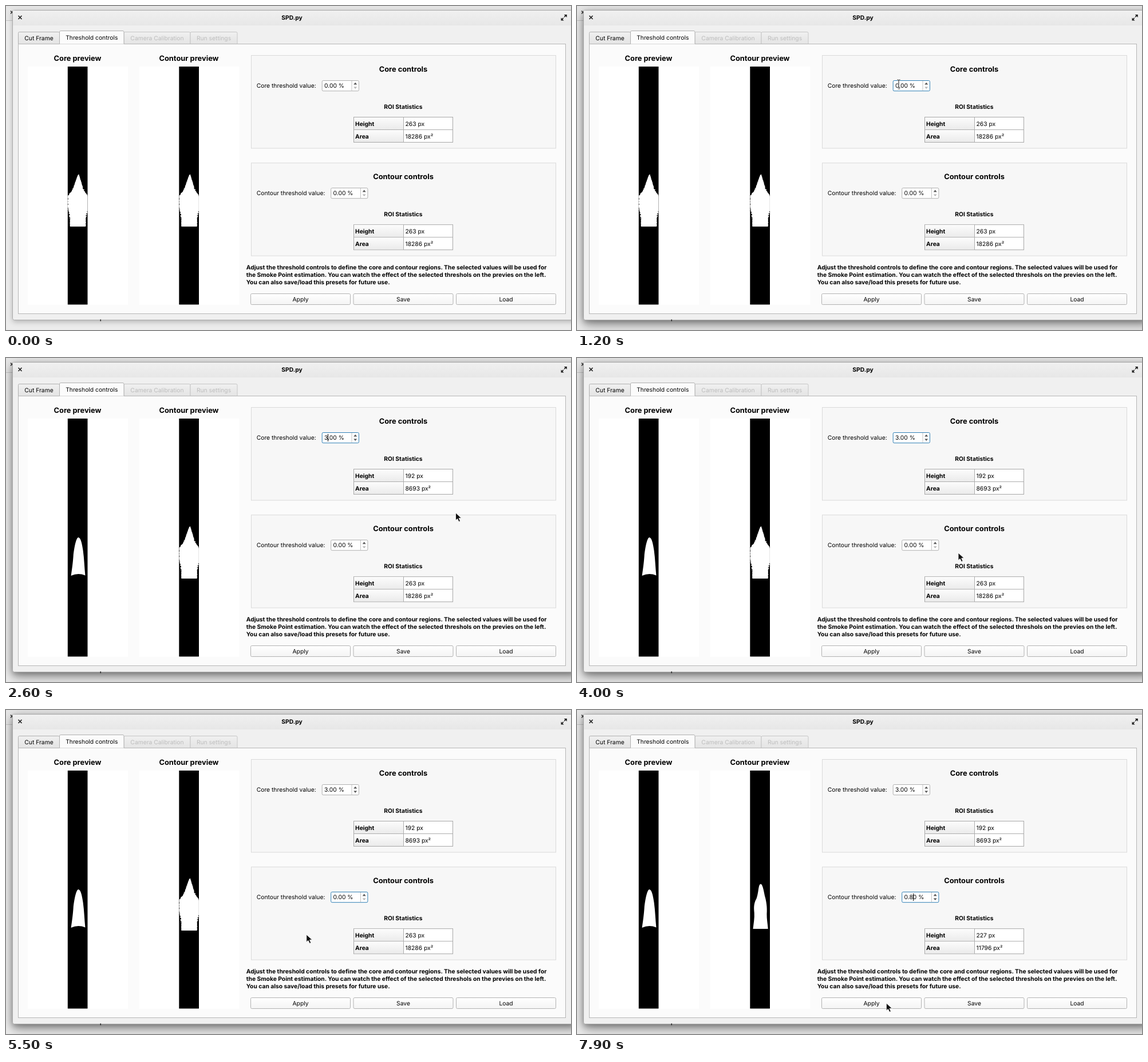
An HTML page that plays this animation: 987x567 px, repeating every 8000 ms.

```html
<!DOCTYPE html>
<html lang="en">
<head>
<meta charset="utf-8">
<title>Threshold controls</title>
<style>
  html, body { margin: 0; width: 100%; height: 100%; overflow: hidden; background: #ebebeb; }
  svg { display: block; width: 100%; height: 100%; }
  text { font: 10.3px Inter, sans-serif; text-rendering: geometricPrecision; white-space: pre; }
  .b { font-weight: 700; }
  .h { font-weight: 700; font-size: 12.85px; }
  .m { text-anchor: middle; }
  .off { fill: #bdbdbd; }
</style>
</head>
<body>
<svg id="stage" viewBox="0 0 987 567" xmlns="http://www.w3.org/2000/svg"></svg>
<script>
const LOOP = 8000, STEP = 100;
const stage = document.getElementById('stage');
const $ = id => document.getElementById(id);
const clamp = (v, lo = 0, hi = 1) => Math.min(hi, Math.max(lo, v));
const mix = (a, b, k) => a + (b - a) * k;
const smooth = (a, b, v) => { const k = clamp((v - a) / (b - a)); return k * k * (3 - 2 * k); };

const rect = (x, y, w, h, fill, stroke = 'none', extra = '') =>
  `<rect x="${x}" y="${y}" width="${w}" height="${h}" fill="${fill}" stroke="${stroke}" ${extra}/>`;
const text = (x, y, s, cls = '', id = '') => `<text x="${x}" y="${y}" class="${cls}" id="${id}">${s}</text>`;
const line = (d, stroke, width = 1) => `<path d="${d}" fill="none" stroke="${stroke}" stroke-width="${width}"/>`;

const gradient = (id, top, bottom) =>
  `<linearGradient id="${id}" x2="0" y2="1"><stop stop-color="${top}"/><stop offset="1" stop-color="${bottom}"/></linearGradient>`;
const shadow = (id, dy, blur, opacity) =>
  `<filter id="${id}" x="-10%" y="-10%" width="120%" height="120%">
    <feDropShadow dx="0" dy="${dy}" stdDeviation="${blur}" flood-opacity="${opacity}"/></filter>`;
const defs = `<defs>${gradient('bar', '#f0f0f0', '#e7e7e7')}${gradient('face', '#fff', '#f4f4f4')}
  ${gradient('head', '#fcfcfc', '#ebebeb')}${gradient('tab', '#f0f0f0', '#e4e4e4')}
  ${shadow('idle', 3, 5, .24)}${shadow('active', 8, 10, .4)}</defs>`;

function frameWindow() {
  const body = rect(11.5, 7.5, 990, 542, '#f0f0f0', '#a9a9a9', 'rx="3"');
  return rect(0, 0, 987, 567, '#ececec') + rect(0, 0, 987, 25, '#e6e6e6') +
    line('M0 25.5H12', '#c4c4c4') + line('M8 8.5l4.5 5M12.5 8.5l-4.5 5', '#333', 1.5) +
    `<g filter="url(#idle)">${body}</g><g id="glow"><g filter="url(#active)">${body}</g></g>` +
    rect(12, 8, 975, 26, 'url(#bar)') +
    rect(164.5, 548.5, 1.5, 3, '#222') +
    line('M21.5 17l6 6M27.5 17l-6 6', '#222', 1.7) +
    line('M975.2 19.4L979 15.6M973.8 20.8L970 24.6', '#222', 1.5) +
    '<path d="M974.8 15h5v5zM969.6 20.4v5h5z" fill="#222"/>' +
    text(499.5, 23.9, 'SPD.py', 'b m') +
    rect(21.5, 66.5, 956, 472, '#fbfbfb', '#b6b6b6');
}

function tab(x, w, label, state) {
  const on = state === 'on', top = on ? 43.5 : 45.5;
  return `<path d="M${x} 66.5V${top + 2}q0-2 2-2h${w - 4}q2 0 2 2V66.5" fill="${on ? '#fbfbfb' : 'url(#tab)'}" stroke="${state === 'off' ? '#c6c6c6' : '#b0b0b0'}"/>` +
    (on ? '' : line(`M${x} 66.5h${w}`, '#b6b6b6')) +
    text(x + w / 2, on ? 59.2 : 59.8, label, 'm ' + state);
}

const preview = (x, title, id) =>
  text(x + 87, 96.2, title, 'h m') + rect(x, 106, 175, 417, '#fff') +
  rect(x + 69.8, 106, 34.7, 416.5, '#000') +
  `<path id="${id}" fill="#fff" transform="translate(${x - 38} 0)"/>`;

const triangle = (x, y, dir, id = '') =>
  `<path id="${id}" d="M${x - 3} ${y + 1.7 * dir}h6l-3 ${-3.6 * dir}z" fill="#555"/>`;

const fields = { core: { x: 552.2, y: 130.5 }, contour: { x: 567.7, y: 318.5 } };

function controls(name, key, y) {
  const top = y + 108, { x, y: fieldY } = fields[key];
  return rect(428.5, y, 532, 162.5, '#f7f7f7', '#dadada') +
    text(694, y + 28.2, name + ' controls', 'h m') +
    text(437.7, fieldY + 12.8, name + ' threshold value:') +
    rect(x, fieldY, 64.2, 18.2, '#fff', '#b0b0b0', `rx="2" id="${key}Box"`) +
    line(`M${x + 51.8} ${fieldY + .5}v17.2`, '#c4c4c4') +
    triangle(x + 58, fieldY + 5.2, 1) + triangle(x + 58, fieldY + 12.6, -1, key + 'Down') +
    text(x + 3.8, fieldY + 12.8, '', '', key + 'Value') +
    text(694, y + 93, 'ROI Statistics', 'b m') +
    rect(607.5, top, 173, 44, '#fff', '#a8a8a8') +
    [0, 22].map(dy => rect(608, top + dy + .5, 86, 21, 'url(#head)')).join('') +
    line(`M694.5 ${top}v44M607.5 ${top + 22}h173`, '#adadad') +
    ['Height', 'Area'].map((label, i) => {
      const base = top + 15.3 + 21.8 * i;
      return text(610, base, label, 'b') + text(697.5, base, '', '', key + label);
    }).join('');
}

const button = (x, label) =>
  rect(x, 503.5, 174, 19, 'url(#face)', '#b2b2b2', 'rx="2"') + text(x + 87, 516.8, label, 'm');

const notes = [
  'Adjust the threshold controls to define the core and contour regions. The selected values will be used for',
  'the Smoke Point estimation. You can watch the effect of the selected threshols on the previes on the left.',
  'You can also save/load this presets for future use.'
];
const beamShape = 'M-2.5-7Q0-7 0-5.5V5.5Q0 7-2.5 7M2.5-7Q0-7 0-5.5M2.5 7Q0 7 0 5.5';

stage.innerHTML = defs + frameWindow() +
  tab(21.5, 72, 'Cut Frame', '') + tab(206, 116, 'Camera Calibration', 'off') +
  tab(322, 82, 'Run settings', 'off') + tab(93.5, 112.5, 'Threshold controls', 'on') +
  preview(38, 'Core preview', 'coreFlame') + preview(232.5, 'Contour preview', 'contourFlame') +
  controls('Core', 'core', 86.5) + controls('Contour', 'contour', 274.7) +
  notes.map((s, i) => text(419.7, 461 + 13 * i, s, 'b')).join('') +
  ['Apply', 'Save', 'Load'].map((label, i) => button(427.5 + 179.5 * i, label)).join('') +
  rect(0, 0, 1, 13, '#000', 'none', 'id="caret"') +
  `<path id="arrow" d="M0 0V13.2L3.1 10.4 5.6 15.6 8.1 14.4 5.7 9.4 10 9.1Z" fill="#111" stroke="#fff" stroke-width=".9" stroke-linejoin="round"/>
  <g id="beam">${line(beamShape, '#fff', 2.4)}${line(beamShape, '#111')}</g>`;

// Spire, bulge and waist, drawn row by row with a noisy edge on the bulge
function raggedFlame() {
  let seed = 7, d = '';
  const random = () => (seed = seed * 16807 % 2147483647) / 2147483647;
  for (let v = 0; v < 91; v++) {
    const half = Math.min(17.8, 1 + .33 * v + 5 * smooth(22, 44, v)) - 4 * smooth(56, 77, v);
    const middle = 126.6 - clamp(v / 40), rough = v > 22 && v < 78 ? 2 : .6;
    const edge = side => clamp(middle + side * (half + (random() - .5) * rough), 108, 142.4);
    const left = edge(-1), right = edge(1);
    d += `M${left} ${295 + v}H${right}v1.05H${left}z`;
  }
  return d;
}
const flames = {
  wide: raggedFlame(),
  core: 'M126.5 314C122.5 314 118.8 333 117.6 347C116.6 361 115 371 113.6 381Q126 375.5 138.4 380.5C137 366 136.6 352 134.6 337C132.6 323 130 314 126.5 314Z',
  contour: 'M126.3 304.5C122 305 123 320 119 330C113 340 115 350 115.2 355C115.8 364 114 374 113 383H139.2C138.6 374 136.8 366 137 357C138 345 136 334 134 327C132 318 130 304.5 126.3 304.5Z'
};
const measured = { core: [192, 8693], contour: [227, 11796] };

// Each edit places the caret after `col` characters and keeps it lit for a while
const edits = [
  { at: 1200, lit: 600, field: 'core', value: '0.00 %', col: 1 },
  { at: 2400, lit: 200, field: 'core', value: '.00 %', col: 0 },
  { at: 2600, lit: 900, field: 'core', value: '3.00 %', col: 1 },
  { at: 4400, lit: 400, field: 'core', value: '3.00 %', col: 1 },
  { at: 5000, lit: 500, field: 'contour', value: '0.00 %', col: 2 },
  { at: 6100, lit: 300, field: 'contour', value: '0.0 %', col: 2 },
  { at: 6400, lit: 700, field: 'contour', value: '0.80 %', col: 3 },
  { at: 7600, lit: 400, field: 'contour', value: '0.80 %', col: 3 }
];

const moves = [
  { from: 200, to: 1000, x: 562, y: 136 },
  { from: 1300, to: 1400, x: 895, y: 225 },
  { from: 1400, to: 1500, x: 785.5, y: 271 },
  { from: 3400, to: 4000, x: 666, y: 341 },
  { from: 4000, to: 4800, x: 580.5, y: 328 },
  { from: 5000, to: 5200, x: 524.8, y: 393 },
  { from: 7200, to: 7900, x: 540.3, y: 513 }
];

function pointer(t) {
  let x = 70, y = 95;
  for (const move of moves) {
    const k = smooth(move.from, move.to, t);
    x = mix(x, move.x, k);
    y = mix(y, move.y, k);
  }
  return [x, y];
}

const overField = (px, py) => Object.values(fields).some(({ x, y }) =>
  px > x && px < x + 52 && py > y && py < y + 18);

function panel(key, t, focused) {
  const edit = edits.filter(e => e.field === key && e.at <= t).pop();
  const value = edit ? edit.value : '0.00 %', active = parseFloat(value) > 0;
  const [height, area] = active ? measured[key] : [263, 18286];
  $(key + 'Value').textContent = value;
  $(key + 'Height').textContent = height + ' px';
  $(key + 'Area').textContent = area + ' px²';
  $(key + 'Flame').setAttribute('d', active ? flames[key] : flames.wide);
  $(key + 'Down').setAttribute('fill', active ? '#555' : '#b4b4b4');
  $(key + 'Box').setAttribute('stroke', focused ? '#2f7fb5' : '#b0b0b0');
}

function place(id, visible, x, y) {
  $(id).setAttribute('visibility', visible ? 'visible' : 'hidden');
  $(id).setAttribute('transform', `translate(${x} ${y})`);
}

function drawCaret(edit, t) {
  if (!edit || t >= edit.at + edit.lit) return place('caret', false, 0, 0);
  const { x, y } = fields[edit.field];
  const offset = edit.col && $(edit.field + 'Value').getSubStringLength(0, edit.col);
  place('caret', true, Math.floor(x + 4 + offset), y + 2.5);
}

function draw(t) {
  const edit = edits.filter(e => e.at <= t).pop();
  for (const key in fields) panel(key, t, edit && edit.field === key);
  drawCaret(edit, t);
  $('glow').setAttribute('opacity', smooth(1000, 1200, t));

  const shown = t >= 200, [x, y] = pointer(t), beam = overField(x, y);
  place('arrow', shown && !beam, x, y);
  place('beam', shown && beam, x, y);
}

const start = performance.now();
let last = -1;
function tick() {
  const t = Math.floor((performance.now() - start) % LOOP / STEP) * STEP;
  if (t !== last) draw(last = t);
  requestAnimationFrame(tick);
}
tick();
</script>
</body>
</html>
```
